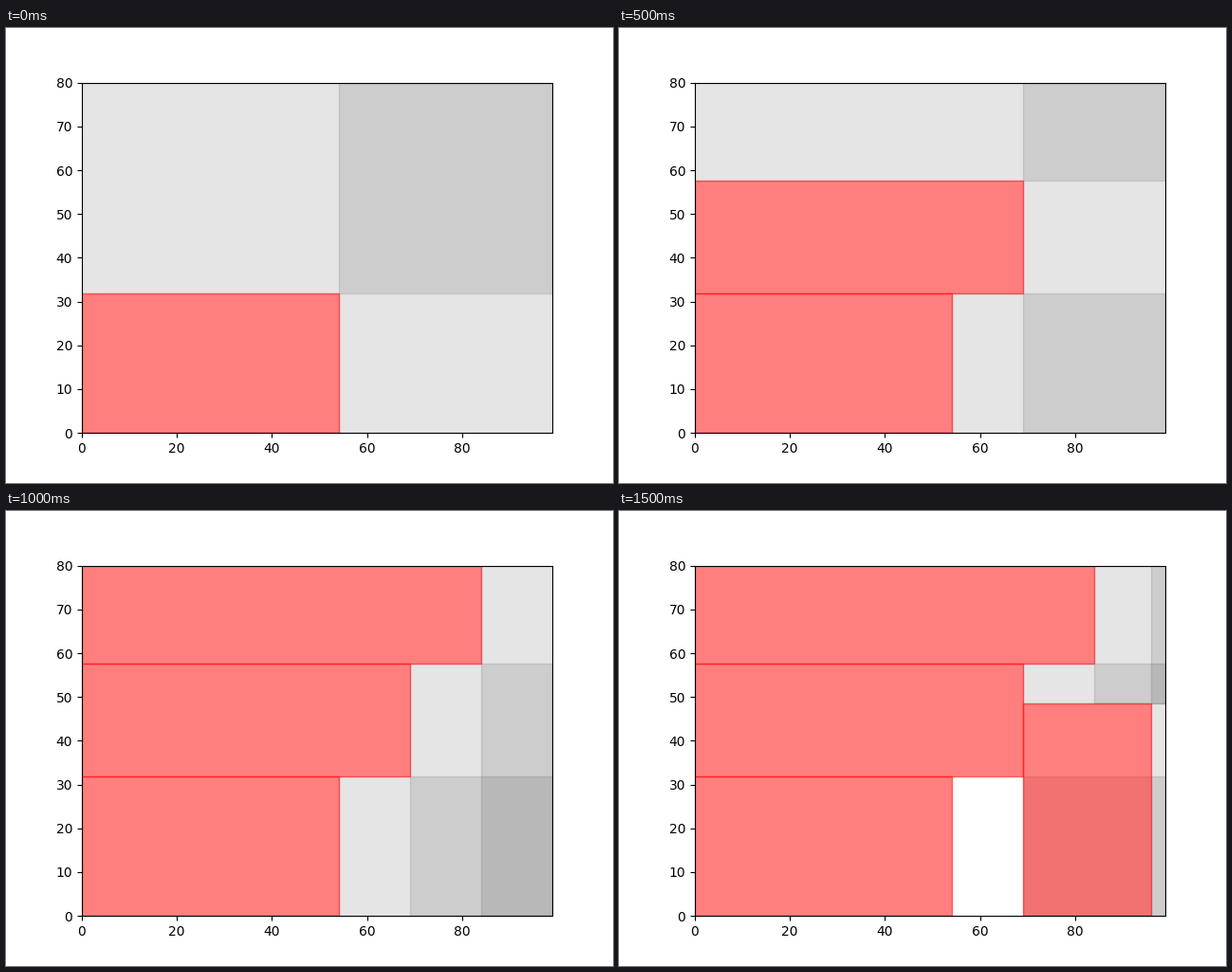
Write a matplotlib script that moves like this. It is 640 px wide and 480 px high and loops after 2000 ms.

```python
import matplotlib.pyplot as plt
from matplotlib.animation import FuncAnimation
from matplotlib.patches import Rectangle

W, H = 99, 80
Y1, Y2, Y3 = 31.9, 57.6, 48.5

# Boxes are (left, bottom, right, top), packed one per step.
PLACED = [
    (0, 0, 54, Y1),
    (0, Y1, 69, Y2),
    (0, Y2, 84, H),
    (69, 0, 96, Y3),
]

# Overlapping free regions left after each step.
FREE = [
    [(54, 0, W, H), (0, Y1, W, H)],
    [(54, 0, W, Y1), (69, 0, W, H), (0, Y2, W, H)],
    [(54, 0, W, Y1), (69, 0, W, Y2), (84, 0, W, H)],
    [(69, 0, W, Y1), (69, Y3, W, Y2), (84, Y3, W, H), (96, 0, W, H)],
]

fig, ax = plt.subplots(figsize=(6.4, 4.8), dpi=100)


def add_box(box, color, alpha):
    left, bottom, right, top = box
    ax.add_patch(Rectangle((left, bottom), right - left, top - bottom,
                           color=color, alpha=alpha, linewidth=1))


def draw(step):
    ax.clear()
    ax.set_xlim(0, W)
    ax.set_ylim(0, H)
    for box in FREE[step]:
        add_box(box, "black", 0.1)
    for box in PLACED[:step + 1]:
        add_box(box, "red", 0.5)
    return ax.patches


anim = FuncAnimation(fig, draw, frames=len(PLACED), interval=500,
                     init_func=lambda: draw(0), repeat=True, repeat_delay=0)
plt.show()
```
